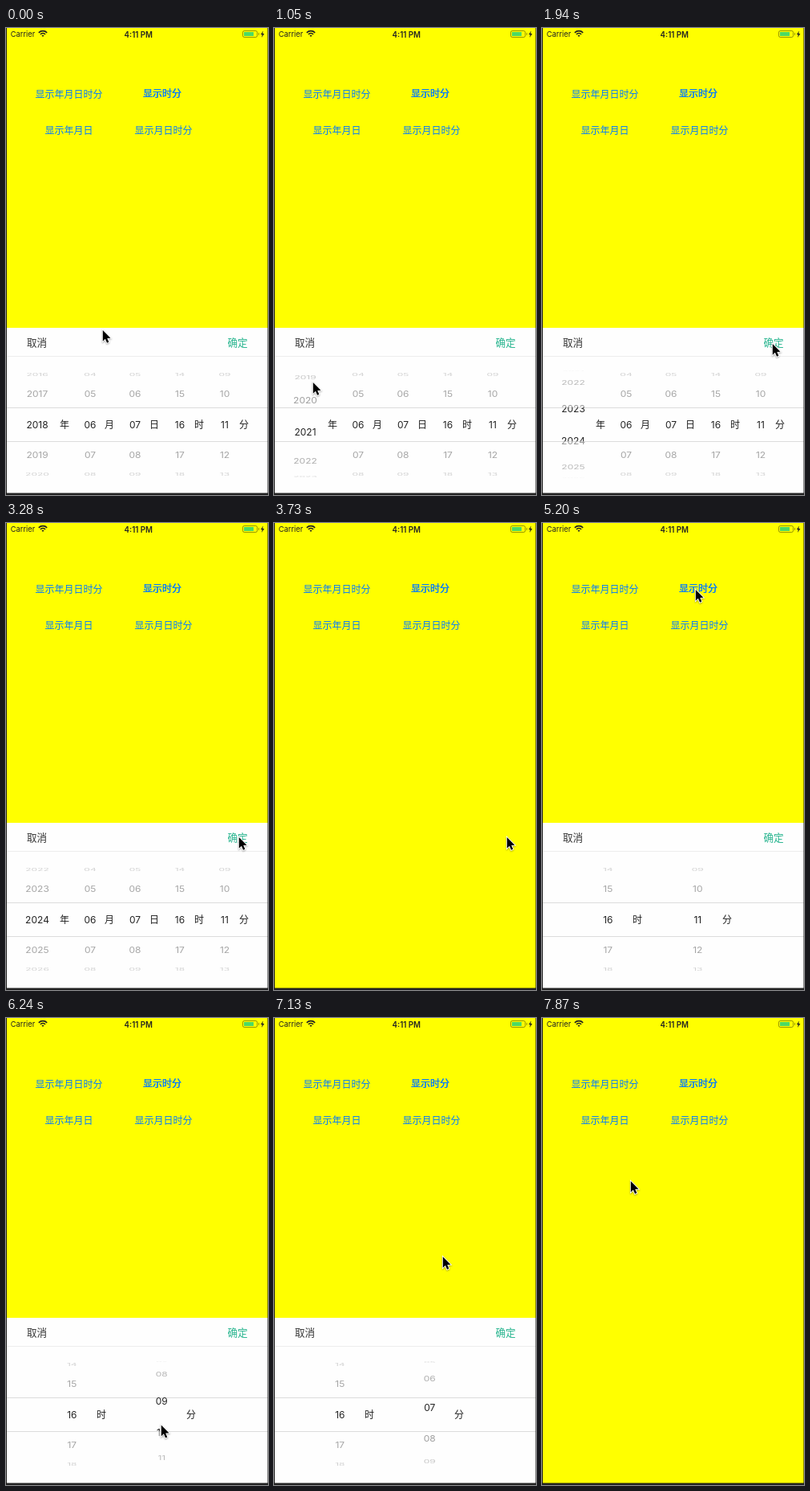
An HTML page with a canvas that plays this animation: 327x581 px, repeating every 8 s.

```html
<!DOCTYPE html>
<html lang="zh-CN">
<head>
<meta charset="utf-8">
<title>Date picker</title>
<style>
html, body { margin: 0; width: 100%; height: 100%; overflow: hidden; background: #ff0; }
canvas { display: block; }
</style>
</head>
<body>
<canvas id="stage" width="327" height="581"></canvas>
<script>
const ctx = document.getElementById('stage').getContext('2d');
const LOOP = 8000, STEP = 148.5;   // the screen refreshes once per STEP ms
const LATIN = 'Inter, sans-serif', CJK = '"Noto Sans CJK SC", "Noto Sans CJK", sans-serif';
const MID = 493.5, BAND_TOP = 472, BAND_BOTTOM = 514;
const RADIUS = 66.7, ROW_ANGLE = 0.606;
const INK = '#222', BLUE = '#007aff';

// Pointer moves: start step, end step, destination
const START = [120, 375];
const MOVES = [
  [0, 4, 52, 515], [4, 7, 48, 440],       // drag the year wheel up
  [7, 13, 287, 392], [16, 19, 290, 390],  // confirm
  [25, 32, 191, 82],                      // press the time button
  [35, 40, 190, 450], [40, 43, 194, 525], // drag the minute wheel down
  [43, 47, 210, 296], [51, 53, 110, 202]  // tap outside
];

const progress = (n, from, to) => Math.min(1, Math.max(0, (n - from) / (to - from)));
const smooth = u => u * u * (3 - 2 * u);
const flick = (n, from, to) => 1 - (1 - progress(n, from, to)) ** 3;

const yearAt = n => 2018 + 6 * flick(n, 4, 20);
const minuteAt = n => 11 - 4 * flick(n, 40, 53);
const pointerAt = n => MOVES.reduce(([x, y], [from, to, toX, toY]) => {
  const u = smooth(progress(n, from, to));
  return [x + (toX - x) * u, y + (toY - y) * u];
}, START);

function rect(x, y, w, h, color) {
  ctx.fillStyle = color;
  ctx.fillRect(x, y, w, h);
}

// Text centred on x, y
function text(str, x, y, size, color, family = CJK, weight = 400) {
  ctx.font = `${weight} ${size}px ${family}`;
  ctx.textAlign = 'center';
  ctx.fillStyle = color;
  ctx.fillText(str, x, y + size * (family === CJK ? 0.38 : 0.364));
}

function polygon(points) {
  ctx.beginPath();
  points.forEach(([x, y]) => ctx.lineTo(x, y));
  ctx.closePath();
}

function statusBar() {
  text('Carrier', 21, 8, 9.4, INK, LATIN);
  text('4:11 PM', 165.3, 8, 9.7, INK, LATIN, 600);

  ctx.strokeStyle = INK;
  ctx.lineWidth = 1.7;
  for (let r = 1.3; r < 8; r += 3) {
    ctx.beginPath();
    ctx.arc(46, 11, r, -Math.PI * 0.75, -Math.PI * 0.25);
    ctx.stroke();
  }

  ctx.strokeStyle = 'rgba(0,0,0,.4)';
  ctx.lineWidth = 1;
  ctx.beginPath();
  ctx.roundRect(295.5, 3.5, 18, 8, 2);
  ctx.stroke();
  rect(297, 5, 12, 5, '#4cd964');
  rect(315, 6, 1, 3, 'rgba(0,0,0,.4)');
  polygon([[321, 3.5], [317.8, 8.2], [319.8, 8.2], [319, 12], [322.4, 7], [320.3, 7]]);
  ctx.fillStyle = INK;
  ctx.fill();
}

function buttons(pressed) {
  text('显示年月日时分', 78.5, 82, 12, BLUE);
  text('显示年月日', 78.5, 127, 12, BLUE);
  text('显示月日时分', 196.5, 127, 12, BLUE);
  // two stacked labels make this one look heavier
  ctx.globalAlpha = pressed ? 0.2 : 1;
  for (const x of [194.8, 195.2]) text('显示时分', x, 81.5, 12, BLUE);
  ctx.globalAlpha = 1;
}

// Rows sit on a cylinder seen from the front
function wheelRows(x, pos, selected) {
  for (let v = Math.ceil(pos - 2.55); v <= pos + 2.55; v++) {
    const angle = (v - pos) * ROW_ANGLE, squeeze = Math.cos(angle);
    ctx.save();
    ctx.translate(x, MID + RADIUS * Math.sin(angle));
    ctx.scale(1, squeeze);
    if (!selected) ctx.globalAlpha = 0.1 + 0.9 * squeeze;
    text(String(v).padStart(2, '0'), 0, 0, 12, selected ? INK : '#939393', LATIN);
    ctx.restore();
  }
}

function wheel(x, pos, unitX, unit) {
  for (const selected of [false, true]) {
    ctx.save();
    ctx.beginPath();
    if (selected) {
      ctx.rect(0, BAND_TOP, 327, BAND_BOTTOM - BAND_TOP);
    } else {
      ctx.rect(0, 409, 327, BAND_TOP - 409);
      ctx.rect(0, BAND_BOTTOM, 327, 578 - BAND_BOTTOM);
    }
    ctx.clip();
    wheelRows(x, pos, selected);
    ctx.restore();
  }
  text(unit, unitX, MID, 12, INK);
}

function panel() {
  rect(1, 373, 326, 206, '#fefefe');
  for (const y of [BAND_TOP, BAND_BOTTOM]) rect(1, y, 326, 1, '#dcdcdc');
  rect(1, 408, 326, 1, '#ededed');
  text('取消', 38.5, 391.5, 12.6, '#333');
  text('确定', 289, 391.5, 12.6, '#26b48e');
}

function datePicker(year) {
  panel();
  wheel(39, year, 73, '年');
  [6, 7, 16, 11].forEach((v, i) => wheel(105 + 56 * i, v, 129 + 56 * i, '月日时分'[i]));
}

function timePicker(minute) {
  panel();
  [16, minute].forEach((v, i) => wheel(82.3 + 112 * i, v, 119 + 112 * i, '时分'[i]));
}

function pointer(x, y) {
  ctx.save();
  ctx.translate(x + 0.8, y + 1);
  ctx.scale(0.94, 0.94);
  polygon([[0, 0], [0, 14.6], [3.3, 11.5], [5.6, 16.8], [8, 15.8], [5.8, 10.6], [10.3, 10.4]]);
  ctx.shadowColor = 'rgba(0,0,0,.35)';
  ctx.shadowBlur = 2;
  ctx.shadowOffsetY = 1;
  ctx.strokeStyle = '#fff';
  ctx.lineWidth = 1.8;
  ctx.stroke();
  ctx.shadowColor = 'transparent';
  ctx.fillStyle = '#000';
  ctx.fill();
  ctx.restore();
}

function draw(n) {
  rect(0, 0, 327, 581, '#ff0');
  statusBar();
  buttons(n === 34);
  if (n < 25) datePicker(yearAt(n));
  else if (n >= 35 && n < 49) timePicker(minuteAt(n));

  rect(0, 0, 1, 581, INK);
  rect(326, 0, 1, 581, 'rgba(0,0,0,.45)');
  rect(0, 578, 327, 1, 'rgba(0,0,0,.45)');
  rect(0, 579, 327, 2, INK);
  pointer(...pointerAt(n));
}

function tick() {
  draw(Math.floor((performance.now() % LOOP + 5) / STEP));
  requestAnimationFrame(tick);
}
tick();
</script>
</body>
</html>
```
